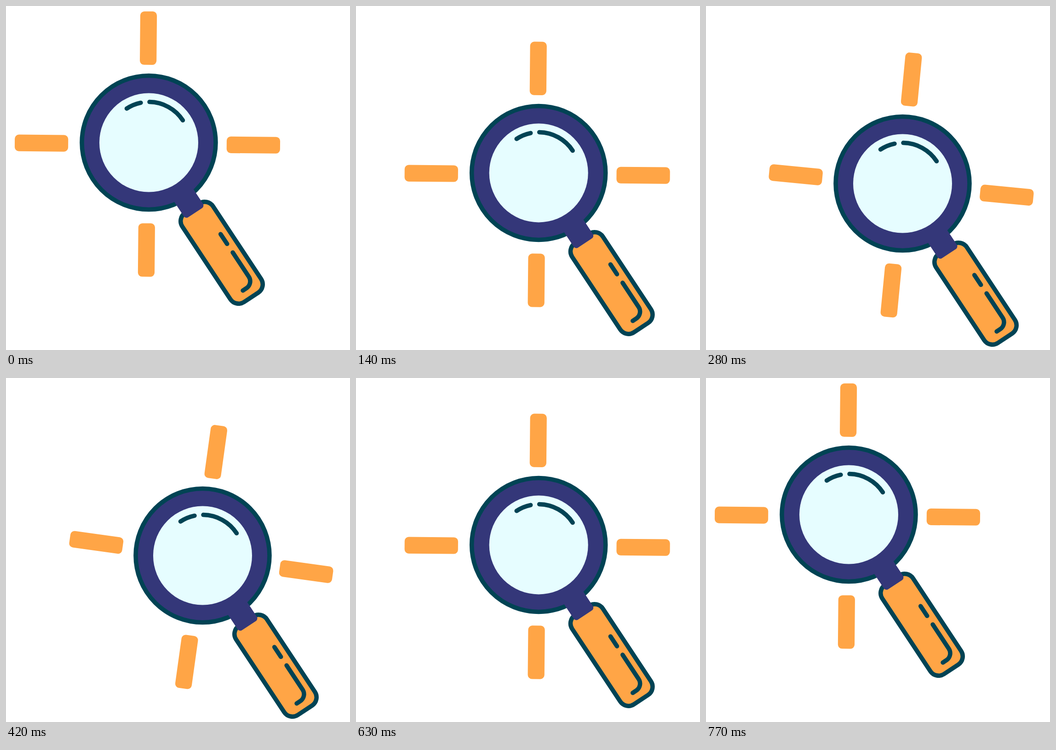
Animation of 748x748 px, one loop 1050 ms. Source, as an HTML page:

```html
<!DOCTYPE html>
<html lang="en">
<head>
<meta charset="utf-8">
<title>Searching</title>
<style>
  html, body { margin: 0; width: 100%; height: 100%; overflow: hidden; background: #fff; }
  svg { display: block; width: 100vw; height: 100vh; }
  .line { stroke: #004354; stroke-width: 9.5; stroke-linecap: round; }
  .navy { fill: #343779; }
  .orange { fill: #ffa546; }
</style>
</head>
<body>
<svg viewBox="0 0 748 748">
  <defs>
    <rect id="ray" class="orange" x="-18.1" y="-288.5" width="36.2" height="116.2" rx="9"/>
  </defs>
  <g id="scene">
    <g id="rays">
      <use href="#ray"/>
      <use href="#ray" transform="rotate(90)"/>
      <use href="#ray" transform="rotate(180)"/>
      <use href="#ray" transform="rotate(270)"/>
    </g>
    <g transform="translate(310.5 297)">
      <circle class="navy line" r="145.5"/>
      <circle r="107.5" fill="#e6fdff"/>
      <path class="line" fill="none" d="M-48-74A88.4 88.4 0 0 1-17.5-86.6M1.5-88.4A88.4 88.4 0 0 1 74-48.4"/>
    </g>
    <g transform="translate(469 536.5) rotate(-33.5)">
      <rect class="orange line" x="-40" y="-116.2" width="80" height="232.4" rx="21.5"/>
      <rect class="navy" x="-25" y="-168" width="50" height="63.5" rx="7"/>
      <path class="line" fill="none" d="M20.4-35V-9.5M20.4 12.8V76A18 18 0 0 1 2.4 94H-7"/>
    </g>
  </g>
</svg>
<script>
  const scene = document.getElementById('scene');
  const rays = document.getElementById('rays');
  const STEP = 70, STEPS = 15;

  // Eased progress from step a to step b, clamped to 0..1
  function ease(step, a, b) {
    const u = Math.min(1, Math.max(0, (step - a) / (b - a)));
    return u * u * (3 - 2 * u);
  }

  function draw(ms) {
    const step = Math.floor(ms / STEP) % STEPS;
    const slide = ease(step, 0, 3) - ease(step, 8, 11);
    const turn = 10 * (ease(step, 3, 5) - ease(step, 5, 8));
    scene.setAttribute('transform', `translate(${117 * slide} ${89 * slide})`);
    rays.setAttribute('transform', `translate(307.5 300.2) rotate(${0.52 + turn})`);
  }

  const start = performance.now();
  function tick() {
    draw(performance.now() - start);
    requestAnimationFrame(tick);
  }
  tick();
</script>
</body>
</html>
```
